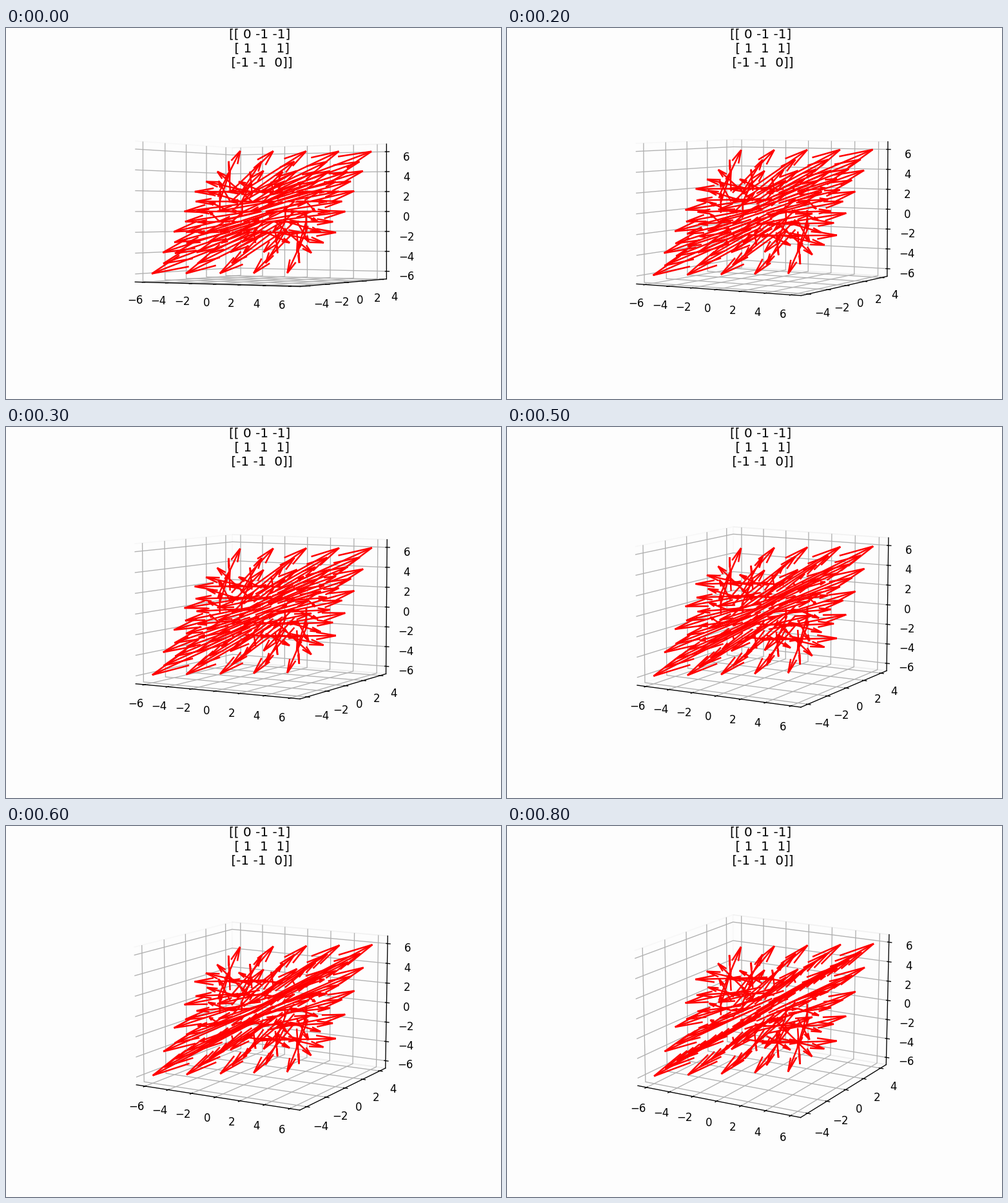
A matplotlib script for the animation above (0.9 s loop, 768x576 px).

```python
import numpy as np
import matplotlib.pyplot as plt
from matplotlib.animation import FuncAnimation

FRAMES, STEP_MS = 9, 100
BACK = "#fdfdfd"
MARGIN = 1 / 48  # free space beyond each axis limit

M = np.array([[0, -1, -1], [1, 1, 1], [-1, -1, 0]])
FIELD = np.rint(np.linalg.inv(M)).T

fig = plt.figure(figsize=(6.4, 4.8), dpi=120, facecolor=BACK)
ax = fig.add_subplot(projection="3d", facecolor=BACK)
ax.set_title(str(M))

# One arrow from every lattice point, along the field at that point
r = np.arange(-2, 3)
pts = np.array(np.meshgrid(r, r, r, indexing="ij")).reshape(3, -1)
ax.quiver(*pts, *(FIELD @ pts), color="red")

ax.set_xlim(-6.5, 6.5, view_margin=MARGIN)
ax.set_ylim(-4.5, 4.5, view_margin=MARGIN)
ax.set_zlim(-6.5, 6.5, view_margin=MARGIN)
for axis in (ax.xaxis, ax.yaxis, ax.zaxis):
    axis.pane.set_facecolor("none")


def draw(i):
    # The small offset keeps the floor, not the ceiling, visible at the start
    ax.view_init(elev=2 * i + 0.01, azim=-60)
    return []


anim = FuncAnimation(fig, draw, frames=FRAMES, init_func=lambda: draw(0),
                     interval=STEP_MS, repeat=True, repeat_delay=0)
plt.show()
```
